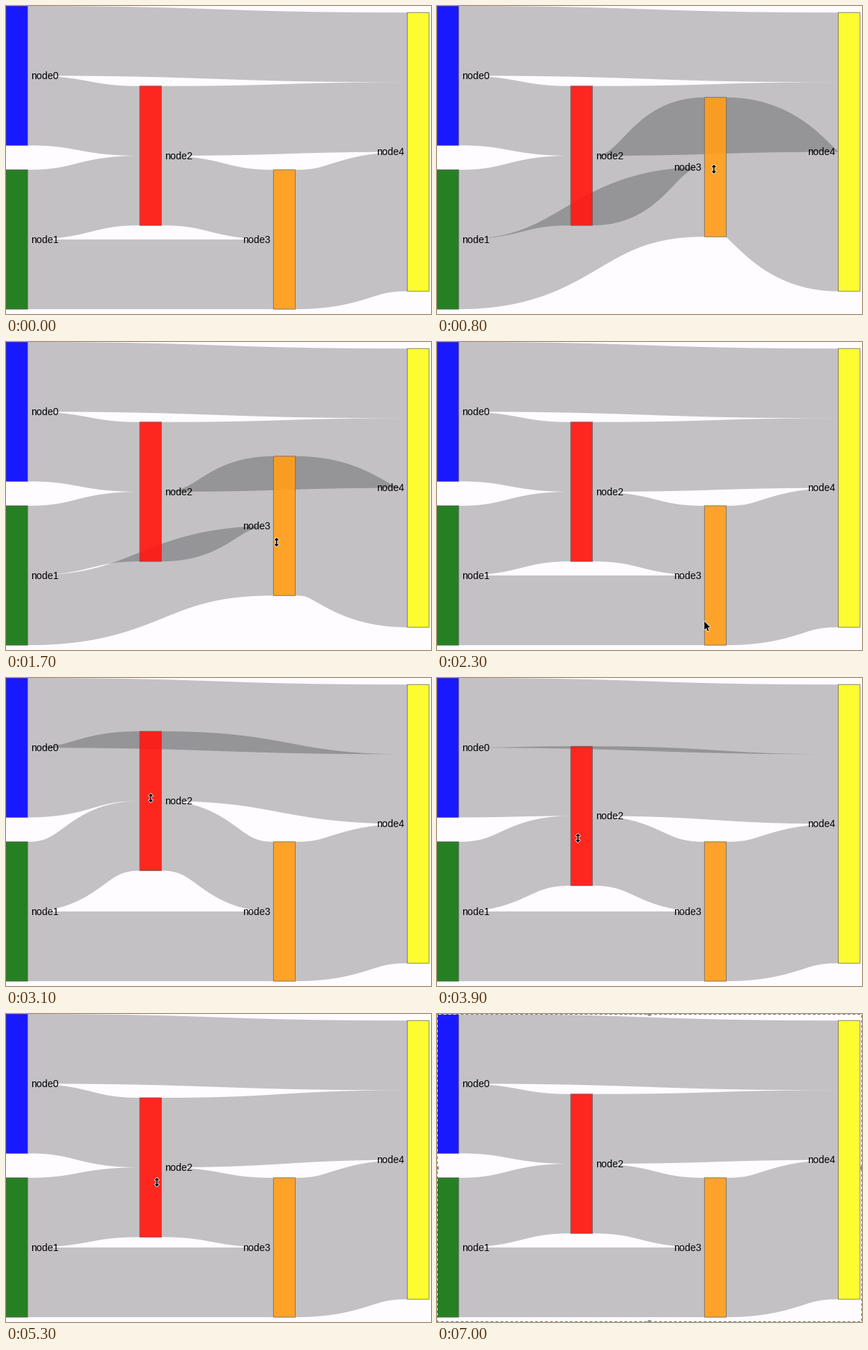
Animation, 600 px wide and 434 px high, one loop 7.7 s. Source, as a matplotlib script:

```python
import numpy as np
import matplotlib.pyplot as plt
from matplotlib.animation import FuncAnimation
from matplotlib.patches import Circle, PathPatch, Polygon, Rectangle
from matplotlib.path import Path

W, H, DPI = 600, 434, 100
PX = 72 / DPI
FRAMES, STEP = 77, 100

UNIT = 98.2
NODE_W = 30.7
COLUMN = 188.83
PAPER = "#fefcff"
FILL = ["#0000ff", "#0e710a", "#ff1008", "#ff9912", "#fdfd1a"]
DEPTH = [0, 0, 1, 2, 3]
LINKS = [(0, 2, 1), (1, 2, 1), (1, 3, 1), (0, 4, 1), (2, 3, 1), (2, 4, 1), (3, 4, 2)]
SIZE = [2, 2, 2, 2, 4]
FLOOR = 230.8
REST_Y = [0, FLOOR, 112.8, FLOOR, 9.2]


def ease_out(t):
    return 1 - (1 - t) ** 1.7


def smooth(t):
    return t * t * (3 - 2 * t)


# legs of each drag: start frame, end frame, new top, easing
DRAG = {
    2: [(30, 34.7, 0, ease_out), (35.8, 43, FLOOR, smooth),
        (46, 53, 118, smooth), (59, 60, REST_Y[2], smooth)],
    3: [(5, 14, 26, ease_out), (14, 20.4, FLOOR, ease_out)],
}
# where on the node the pointer holds it: frames, distances below its top
GRIP = {
    2: ([30, 31, 39, 53], [116, 104, 115, 119]),
    3: ([1, 3, 17, 21], [147, 109, 111, 188]),
}
POINTER_X = ([3, 11, 17, 22, 30, 39, 53], [387.5, 393, 382, 402, 205, 199, 213])
LEAD = 0.3
RELEASE, REGRAB = 22, 30
POINTER_ON, POINTER_OFF = 1, 60
BORDER_ON, BORDER_STILL = 60, 65


def top(node, t):
    y = REST_Y[node]
    for start, end, goal, ease in DRAG.get(node, []):
        y += (goal - y) * ease(np.clip((t - start) / (end - start), 0, 1))
    return y


def held(node, t):
    return top(node, t + LEAD) + np.interp(t, *GRIP[node])


def pointer_at(t):
    x = np.interp(t, *POINTER_X)
    if t <= RELEASE:
        return x, held(3, t)
    if t >= REGRAB:
        return x, held(2, t)
    return x, np.interp(t, [RELEASE, REGRAB], [held(3, RELEASE), held(2, REGRAB)])


def ribbon(x0, y0, x1, y1, width, n=90):
    """Constant-width stroke along a horizontal S-curve, as one path of quads."""
    t = np.linspace(0, 1, n + 1)
    s = 1 - t
    xm = (x0 + x1) / 2
    x = s**3 * x0 + 3 * s * t * xm + t**3 * x1
    y = y0 + (y1 - y0) * smooth(t)
    dx = 3 * (s**2 + t**2) * (xm - x0)
    dy = 6 * s * t * (y1 - y0)
    off = np.column_stack([-dy, dx]) / np.hypot(dx, dy)[:, None] * width / 2
    mid = np.column_stack([x, y])
    a, b = mid - off, mid + off
    quads = np.stack([a[:-1], a[1:], b[1:], b[:-1]], axis=1)
    # same winding for all, so that folded parts stay filled
    d1, d2 = quads[:, 2] - quads[:, 0], quads[:, 3] - quads[:, 1]
    flip = d1[:, 0] * d2[:, 1] - d1[:, 1] * d2[:, 0] < 0
    quads[flip] = quads[flip][:, ::-1]
    verts = np.concatenate([quads, quads[:, :1]], axis=1).reshape(-1, 2)
    codes = [Path.MOVETO] + [Path.LINETO] * 3 + [Path.CLOSEPOLY]
    return Path(verts, codes * n)


def stack(tops, end):
    """Top of every link at its source (end=0) or target (end=1)."""
    place = {}
    for node in range(5):
        mine = [k for k in range(len(LINKS)) if LINKS[k][end] == node]
        y = tops[node]
        for k in sorted(mine, key=lambda k: tops[LINKS[k][1 - end]]):
            place[k] = y
            y += LINKS[k][2] * UNIT
    return place


fig = plt.figure(figsize=(W / DPI, H / DPI), dpi=DPI, facecolor=PAPER)
ax = fig.add_axes([0, 0, 1, 1])
ax.set_xlim(0, W)
ax.set_ylim(H, 0)
ax.axis("off")


def add(patch, z, **style):
    patch.set(snap=False, zorder=z, **style)
    return ax.add_patch(patch)


ribbons = [add(PathPatch(ribbon(0, 0, 1, 0, 1)), 1, fc="black", ec="none", alpha=0.232)
           for _ in LINKS]

boxes, outlines, labels = [], [], []
for k in range(5):
    x, h = COLUMN * DEPTH[k], SIZE[k] * UNIT
    boxes.append(add(Rectangle((x, 0), NODE_W, h), 2, fc=FILL[k], ec="none", alpha=0.9))
    outlines.append(add(Rectangle((x, 0), NODE_W, h), 3, fc="none", ec="#606060",
                        lw=0.9 * PX, alpha=0.85))
    left = DEPTH[k] < 2
    labels.append(ax.text(x + NODE_W + 4.4 if left else x - 4.6, 0, f"node{k}",
                          ha="left" if left else "right", va="baseline",
                          family="Liberation Sans", size=14 * PX, color="black",
                          zorder=4))

HALF = [(0, -6.5), (3.4, -2.6), (0.8, -2.6), (0.8, 2.6), (3.4, 2.6)]
RESIZE = np.array(HALF + [(-x, -y) for x, y in HALF])
ARROW = np.array([(0, 0), (0, 12), (2.8, 9.5), (4.7, 13.8), (6.5, 13), (4.7, 8.8),
                  (8.4, 8.6)])
pointer = [add(Polygon(RESIZE), 6, fc="white", ec="white", lw=1.5 * PX),
           add(Polygon(RESIZE), 7, fc="black", ec="none")]

rim = [add(Rectangle((0.5, 0.5), W - 1, H - 1), 8, fc="none", ec=c, lw=PX)
       for c in ("white", "#747474")]
knobs = [add(Circle(p, 2.8), 9, fc="#8a8a8a", ec="#b5b5b5", lw=0.6 * PX)
         for p in [(W / 2, 0), (W / 2, H), (0, H / 2), (W, H / 2)]]


def over_node(x, y, tops):
    return any(0 <= x - COLUMN * DEPTH[k] <= NODE_W
               and 0 <= y - tops[k] <= SIZE[k] * UNIT for k in range(5))


def update(i):
    tops = [top(k, i) for k in range(5)]
    starts, ends = stack(tops, 0), stack(tops, 1)
    for k, (a, b, units) in enumerate(LINKS):
        w = units * UNIT
        ribbons[k].set_path(ribbon(COLUMN * DEPTH[a] + NODE_W, starts[k] + w / 2,
                                   COLUMN * DEPTH[b], ends[k] + w / 2, w))
    for k, y in enumerate(tops):
        boxes[k].set_y(y)
        outlines[k].set_y(y)
        labels[k].set_y(y + SIZE[k] * UNIT / 2 + 4.8)

    x, y = pointer_at(i)
    shape = RESIZE if over_node(x, y, tops) else ARROW
    for part in pointer:
        part.set_xy(shape + (x, y))
        part.set_visible(POINTER_ON <= i < POINTER_OFF)

    for part in rim + knobs:
        part.set_visible(i >= BORDER_ON)
    rim[1].set_linestyle((min(i, BORDER_STILL) % 7, (4, 3)))
    return []


anim = FuncAnimation(fig, update, frames=FRAMES, interval=STEP, repeat=True,
                     repeat_delay=0, init_func=lambda: update(0), blit=False)
plt.show()
```
